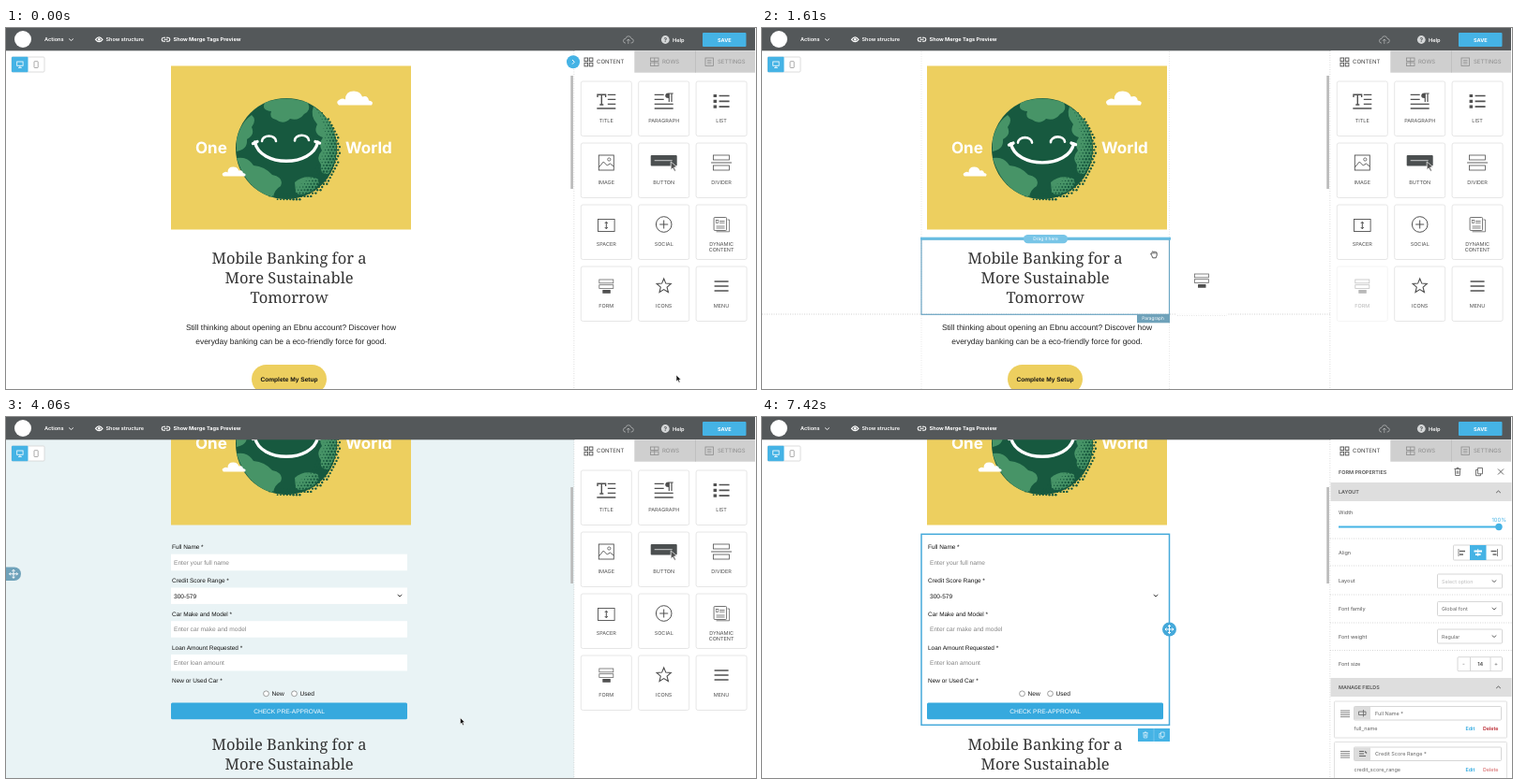
An HTML page for the animation above (7.49 s loop, 800x386 px).

```html
<!DOCTYPE html>
<html lang="en">
<head>
<meta charset="utf-8">
<title>Email editor</title>
<style>
html, body { margin: 0; width: 100%; height: 100%; overflow: hidden; background: #fff; }
svg { display: block; width: 800px; height: 386px; font-family: Inter, sans-serif; text-rendering: geometricPrecision; }
.arial { font-family: "Liberation Sans", Arial, sans-serif; }
.serif { font-family: "Noto Serif", Georgia, serif; }
.mid { text-anchor: middle; }
.bold { font-weight: 700; }
.semi { font-weight: 600; }
</style>
</head>
<body>
<svg id="stage" viewBox="0 0 800 386" fill="none"></svg>
<script>
const INK = '#505050', BLUE = '#45b3e5', DULL = '#6fa2ba', YELLOW = '#edcf5f', DARK = '#17593f', LAND = '#479467';

// Drawing helpers returning SVG markup
const rect = (x, y, w, h, fill, more = '') => `<rect x="${x}" y="${y}" width="${w}" height="${h}" fill="${fill}" ${more}/>`;
const box = (x, y, w, h, color, r = 0, fill = 'none', sw = 1) => rect(x, y, w, h, fill, `rx="${r}" stroke="${color}" stroke-width="${sw}"`);
const text = (x, y, s, size, fill = INK, cls = '') => `<text x="${x}" y="${y}" font-size="${size}" fill="${fill}" class="${cls}">${s}</text>`;
const line = (d, color = INK, w = 1, more = '') => `<path d="${d}" stroke="${color}" stroke-width="${w}" ${more}/>`;
const shape = (d, fill, more = '') => `<path d="${d}" fill="${fill}" ${more}/>`;
const disc = (x, y, r, fill, more = '') => `<circle cx="${x}" cy="${y}" r="${r}" fill="${fill}" ${more}/>`;
const group = (id, body) => `<g id="${id}">${body}</g>`;
const at = (x, y, body, s = 1) => `<g transform="translate(${x} ${y}) scale(${s})">${body}</g>`;

const round = 'stroke-linecap="round" stroke-linejoin="round"';
const dots = 'stroke-dasharray="1 1.5"';
const trash = c => line('M-3.5 -3H3.5M-1 -3V-4.2H1V-3M-2.7 -3L-2.3 4H2.3L2.7 -3M-.8 -1V2.3M.8 -1V2.3', c, .8);
const copy = c => line('M-1.5 -4H3.5V2.3H-1.5ZM-1.5 -2H-3.5V4.2H1.5V2.3', c, .8);
const chevron = (x, y, up, c = INK) => line(`M${x - 2.3} ${y + up}l2.3 ${-2 * up}l2.3 ${2 * up}`, c, .9);
const arrows = line('M-4.5 0H4.5M0 -4.5V4.5M-3 -1.5L-4.5 0L-3 1.5M3 -1.5L4.5 0L3 1.5M-1.5 -3L0 -4.5L1.5 -3M-1.5 3L0 4.5L1.5 3', '#fff', 1);

function globe() {
  let s = disc(299, 129, 54, DARK);
  s += shape('M276 80Q298 71 322 80Q326 88 318 92Q312 100 303 97Q296 104 288 98Q280 96 283 89Q272 88 276 80Z', LAND);
  s += shape('M246 119Q250 101 262 93Q268 98 262 106Q266 114 257 119Q258 130 246 132Z', LAND);
  s += shape('M246 139Q258 137 264 147Q276 148 284 157Q297 160 293 169Q286 173 285 181Q257 174 246 139Z', LAND);
  s += shape('M328 84Q349 98 352 122Q354 141 344 156Q334 157 336 146Q330 139 337 131Q333 124 338 117Q327 113 332 103Q324 94 328 84Z', LAND);
  s += shape('M308 165Q318 156 332 161Q337 166 327 174Q314 181 309 176Z', LAND);
  for (let row = 0; row < 36; row++) for (let col = 0; col < 36; col++) {
    const x = 242 + col * 3.4 + row % 2 * 1.7, y = 71 + row * 3.3;
    const d = Math.hypot(x - 299, y - 129), w = Math.cos(Math.atan2(y - 129, x - 299) - .5);
    if (w > 0 && d > 54 - 17 * w && d < 54 + 4 * w)
      s += disc(x.toFixed(1), y.toFixed(1), Math.min(1.2, .4 + (d - 54 + 17 * w) / 13).toFixed(1), DARK);
  }
  return s;
}

const cloud = shape('M2 15Q-2 11 3 9Q6 7 9 9Q9 0 18 0Q25 0 27 6Q33 4 34 10Q40 11 37 15Z', '#fff');

const picture = rect(176, 40.5, 256, 175, YELLOW) + globe() +
  group('face', line('M273 121A7.5 5.5 0 0 1 288 121M308 120.5A7.5 5.5 0 0 1 323 120', '#fff', 2.6, round) +
    line('M265.5 122C271 149 327 149 332.5 122M263.5 123.5L268 121.5M330 121.5L334.5 123', '#fff', 3.4, round)) +
  text(202, 134, 'One', 17, '#fff', 'bold') + text(362, 134, 'World', 17, '#fff', 'bold') +
  group('cloudR', cloud) + group('cloudL', cloud);

const copyBlock = ['Mobile Banking for a', 'More Sustainable', 'Tomorrow']
    .map((s, i) => text(302, 251.8 + 21.3 * i, s, 16.5, '#333', 'serif mid')).join('') +
  text(304, 323, 'Still thinking about opening an Ebnu account? Discover how', 8.45, '#222', 'arial mid') +
  text(304, 338, 'everyday banking can be a eco-friendly force for good.', 8.45, '#222', 'arial mid') +
  rect(262, 360, 80, 31, YELLOW, 'rx="15.5"') +
  text(302, 378, 'Complete My Setup', 6.6, '#111', 'arial mid bold');

function form() {
  const fields = [['Full Name', 'Enter your full name'], ['Credit Score Range', '300-579'],
    ['Car Make and Model', 'Enter car make and model'], ['Loan Amount Requested', 'Enter loan amount'], ['New or Used Car']];
  let s = fields.map(([label, hint], i) => {
    const y = 241.3 + 35.75 * i;
    return text(177, y, label + ' *', 6.45, '#111', 'arial') + (hint ? rect(176, y + 5.4, 252, 17.5, '#fff') +
      text(179, y + 16.6, hint, 6.6, i === 1 ? '#111' : '#858585', 'arial') : '');
  }).join('');
  s += chevron(420, 291, -1, '#222');
  for (const [x, label] of [[277.5, 'New'], [307.5, 'Used']])
    s += disc(x, 395.8, 2.9, '#fff', 'stroke="#777" stroke-width=".7"') + text(x + 6, 398.2, label, 6.6, '#111', 'arial');
  return s + rect(176, 405.5, 252, 17.8, '#36a9de', 'rx="1.5"') +
    text(302, 416.8, 'CHECK PRE-APPROVAL', 6.6, '#fff', 'arial mid');
}

const outline = (color, w) => box(170, 225.3, 264.5, 204, color, 0, 'none', w) + disc(434.5, 327, 7.5, color) + at(434.5, 327, arrows);
const hovered = outline(DULL, 1.4) + rect(400, 429, 35, 9, DULL) + text(417, 435.3, 'Form', 4.6, '#fff', 'mid semi');
const selected = outline('#45a9da', 1.5) + rect(401, 433, 34, 14, BLUE) + line('M418 433V447', '#8fd2f0', .6) +
  at(409, 440, trash('#fff'), .75) + at(426.5, 440, copy('#fff'), .75);

const formIcon = box(-7.5, -7, 15, 3.8, '#6a6a6a', 0, '#fff', .8) + box(-7.5, -1.3, 15, 3.8, '#6a6a6a', 0, '#fff', .8) + rect(-4, 4, 8.5, 3.8, INK, 'rx=".5"');
const ghost = rect(-27, -29, 55, 67, '#fff', 'rx="2" opacity=".85"') + line('M-26 37.5H27', '#ddd', .8, dots) + formIcon;
const dropZone = line('M170 25V386M434.5 25V386', '#ddd', .7, dots) + line('M0 306H606', '#c4c4c4', .8, dots) +
  box(170, 226, 264.5, 80.3, '#6ba5c3', 0, 'none', 1.2) + rect(169, 223.7, 267, 3, '#68bde2') +
  rect(279, 221, 47, 9.3, '#78c5e7', 'rx="4.6"') + text(302.5, 227.4, 'Drag it here', 4.8, '#fff', 'mid') +
  rect(400, 306, 35, 9.3, DULL) + text(417, 312.3, 'Paragraph', 4.8, '#fff', 'mid');

// Tool cards; icons are drawn around (0, 0)
const star = Array.from({ length: 10 }, (_, i) => {
  const a = i * Math.PI / 5 - Math.PI / 2, r = i % 2 ? 3.6 : 8;
  return (r * Math.cos(a)).toFixed(1) + ' ' + (r * Math.sin(a)).toFixed(1);
}).join('L');
const cards = [
  ['TITLE', line('M-9.3 -4V-6.7H-.7V-4M-5 -6.7V4M-7 4H-3', INK, 1.4) + line('M1.5 -6.7H10M1.5 -1.7H10M1.5 3.3H10M-10 8H10', INK, 1.3)],
  ['PARAGRAPH', line('M-10 -6.7H0M-10 -1.7H0M-10 3.3H10M-10 8H10', INK, 1.3) + shape('M10 -8.5H5Q1.5 -8.5 1.5 -5.5Q1.5 -3 5 -3V1H6.2V-7.4H7.7V1H8.9V-7.4H10Z', INK)],
  ['LIST', line('M-8.5 -5.5H-5M-8.5 .3H-5M-8.5 6.1H-5', INK, 3.2) + line('M-2.5 -5.5H8.5M-2.5 .3H8.5M-2.5 6.1H8.5', INK, 1.7)],
  ['IMAGE', box(-8, -8, 16, 16, INK, 0, 'none', .9) + line('M-8 5L-3 -1L1 3L4 1L8 4', INK, .9) + disc(3, -3.5, 1.6, 'none', `stroke="${INK}" stroke-width=".8"`)],
  ['BUTTON', rect(-14, -8, 28, 11.5, '#4b4f50', 'rx="1"') + line('M-10 -2.3H9', '#ddd', .9) + shape('M7.5 -1L14 4.5L11 5L12.8 8.5L11.3 9.2L9.6 5.8L7.5 7.5Z', INK, 'stroke="#fff" stroke-width=".7"')],
  ['DIVIDER', box(-8.5, -8, 17, 5, INK, 0, 'none', .8) + line('M-11 0H11', INK, .9) + box(-8.5, 3, 17, 5, INK, 0, 'none', .8)],
  ['SPACER', box(-8.8, -5.5, 17.6, 13, INK, 0, 'none', .9) + line('M0 -2.5V4.5M-1.5 -1L0 -2.8L1.5 -1M-1.5 3L0 4.8L1.5 3', INK, 1)],
  ['SOCIAL', disc(0, 0, 8.3, 'none', `stroke="${INK}"`) + line('M-4.5 0H4.5M0 -4.5V4.5', INK)],
  ['DYNAMIC|CONTENT', box(-8, -7.5, 13.5, 14, INK, 1, '#fff', .8) + line('M-5.5 7.8H8.5V-5H6.5M-2 -3.5H3.5M-2 -1.7H3.5M-5.5 2H3.5M-5.5 4H3.5', INK, .7) + box(-5.8, -4.5, 2.5, 3, INK, 0, 'none', .6)],
  ['FORM', formIcon],
  ['ICONS', line(`M${star}Z`, INK, 1.1)],
  ['MENU', line('M-7.5 -5H7.5M-7.5 0H7.5M-7.5 5H7.5', INK, 1.6)]
].map(([label, icon], i) => {
  const x = 613.3 + i % 3 * 61.4, y = 57 + Math.floor(i / 3) * 66;
  const names = label.split('|');
  return group(names[0], box(x, y, 54, 58.5, '#e0e0e0', 2, '#fff', .8) + at(x + 27, y + 21, icon) +
    names.map((s, j) => text(x + 27, y + 43.7 + 6.2 * j, s, 5.5, INK, 'mid')).join(''));
}).join('');

function properties() {
  const bar = (y, s) => rect(606.5, y, 193, 20, '#dedede') + text(615, y + 12, s, 5.4, '#555', 'semi') + chevron(785.5, y + 10, 1);
  const select = (y, s, c) => box(720.5, y, 69, 15, '#ccc', 1, '#fff', .8) + text(725, y + 9.5, s, 5.4, c) + chevron(781, y + 7.5, -1);
  const separators = [130, 159, 190, 220, 249.5].map(y => `M606 ${y}H800`).join('');
  let s = rect(606.5, 48, 194, 338, '#fff') + text(615, 60.8, 'FORM PROPERTIES', 5.5, '#555', 'semi') +
    at(742, 58.5, trash('#555')) + at(765, 58.5, copy('#555')) + line('M785 55.5L791 61.5M791 55.5L785 61.5', '#555', .9) +
    bar(70, 'LAYOUT') + line(separators, '#ccc', .8, dots) +
    ['Width|104', 'Align|147', 'Layout|177.3', 'Font family|207', 'Font weight|236.7', 'Font size|266.3']
      .map(v => v.split('|')).map(([label, y]) => text(615, y, label, 5.5, '#555')).join('') +
    text(778.5, 111.5, '100%', 5.8, BLUE) + line('M615 117.5H786', BLUE, 1.8) + disc(786, 117.5, 3.7, BLUE) +
    box(737.5, 137, 52, 16, '#ccc', 1, '#fff', .8) + rect(755, 137, 17.5, 16, BLUE) +
    line('M743 141V149M784.5 141V149', '#666', .8) + line('M744 143.5H750M744 147H748M777.5 143.5H783.5M779.5 147H783.5', '#666', 1.7) +
    line('M763.7 141V149', '#fff', .8) + line('M759.5 143.5H768M761 147H766.5', '#fff', 1.8) +
    select(168, 'Select option', '#bbb') + select(197.5, 'Global font', '#666') + select(227, 'Regular', '#666') +
    box(742, 256.7, 47.5, 15, '#ccc', 1, '#fff', .8) + line('M755.5 257V271.5M777 257V271.5', '#ccc', .8) +
    text(748.5, 266.4, '-', 6, '#666', 'mid') + text(766.3, 266.4, '14', 5.5, '#444', 'mid semi') + text(783, 266.4, '+', 6, '#666', 'mid') +
    bar(279, 'MANAGE FIELDS');
  [['Full Name *', 'full_name'], ['Credit Score Range *', 'credit_score_range']].forEach(([label, key], i) => {
    const y = 304 + 43.5 * i;
    s += box(610.5, y, 184, 39, '#d8d8d8', 1, '#fff', .8) +
      line([10, 12.2, 14.4, 16.6].map(d => `M617 ${y + d}H627`).join(''), '#777', .9) +
      box(631.5, y + 5.5, 157, 14.5, '#ccc', 1, '#fff', .8) + rect(632, y + 6, 17, 13.5, '#dcdcdc') +
      (i ? line(`M637 ${y + 10}H642M637 ${y + 12.5}H642M637 ${y + 15}H644M643 ${y + 10}l2 2`, '#666', 1.2)
         : line(`M636.5 ${y + 11}H644V${y + 14.5}H636.5ZM641.5 ${y + 9}V${y + 16.5}`, '#666', .8)) +
      text(654, y + 14.8, label, 5.5, '#666') + text(631.5, y + 31.3, key, 5.5, '#666') +
      text(750.5, y + 31.3, 'Edit', 5.3, '#2fa9e0', 'semi') + text(769, y + 31.3, 'Delete', 5.3, i ? '#dc7c7c' : '#b8232c', 'semi');
  });
  return s;
}

const header = rect(0, 0, 799, 24.3, '#54585a') + disc(18, 12, 9, '#fff') +
  text(41, 14.3, 'Actions', 5.6, '#fff', 'semi') + chevron(69.5, 12.5, -1, '#fff') +
  line('M95.5 12.3Q99.3 7.5 103 12.3Q99.3 17 95.5 12.3Z', '#fff', 1.1) + disc(99.3, 12.3, 1.4, '#fff') +
  text(106.5, 14.3, 'Show structure', 5.5, '#fff', 'semi') +
  line('M170 10.3H168Q166.2 10.3 166.2 12.3T168 14.3H170M171 10.3H173Q174.8 10.3 174.8 12.3T173 14.3H171M168.5 12.3H172.5', '#fff', 1.1) +
  text(178.5, 14.3, 'Show Merge Tags Preview', 5.6, '#fff', 'bold') +
  group('sync', line('M661 16H660.5Q658.5 16 658.5 13.7T661 11.3Q661.5 8.7 664 8.7T667 11.3Q669.3 11.5 669.3 13.7T667 16H666.5M663.8 17V12M662 13.8L663.8 12L665.6 13.8', '#fff', .9)) +
  disc(703.3, 12.5, 4.4, '#d5d7d8') + text(703.3, 14.9, '?', 6.5, '#54585a', 'mid bold') + text(711, 14.5, 'Help', 5.7, '#fff', 'semi') +
  rect(743, 5, 46.5, 15, BLUE, 'rx="1"') + text(766.3, 14.5, 'SAVE', 5.5, '#fff', 'mid bold');

const tabs = rect(606.5, 24.3, 194, 23.7, '#fff') + rect(670.3, 24.3, 128.7, 23.4, '#cfcfcf') + line('M735.5 24.5V47.7', '#bdbdbd', .8) +
  [[617, 32], [622.3, 32], [617, 37.3], [622.3, 37.3]].map(([x, y]) => box(x, y, 3.6, 3.6, INK, 0, 'none', .9)).join('') +
  text(630, 38.3, 'CONTENT', 6, '#444') +
  box(687.5, 32, 8.5, 3.5, '#8d8d8d', 0, 'none', .8) + box(687.5, 37, 8.5, 3.5, '#8d8d8d', 0, 'none', .8) + line('M691.7 32V40.5', '#8d8d8d', .8) +
  text(700, 38.3, 'ROWS', 6, '#8d8d8d') +
  box(746, 32, 8.5, 8.5, '#8d8d8d', 0, 'none', .8) + line('M748 34.5H752.5M748 36.3H752.5M748 38.1H752.5', '#8d8d8d', .7) +
  text(759, 38.3, 'SETTINGS', 6, '#8d8d8d');

const devices = box(6, 31, 35, 16, '#d4d4d4', 1, '#fff', .8) + rect(6, 30.7, 17.5, 16.6, BLUE, 'rx="1"') +
  box(11.7, 36, 6.4, 4.3, '#fff', 0, 'none', .8) + line('M14.9 40.3V42.5M13 42.5H16.8', '#fff', .8) +
  box(30, 35.7, 4.2, 6.8, '#888', .6, 'none', .7);

const arrow = shape('M0 0V7L1.6 5.6L2.8 8.2L4 7.6L2.9 5.1H5Z', '#111', 'stroke="#fff" stroke-width=".6"');
const hand = shape('M-2.3 1.2L-3.4 -.5Q-3 -1.6 -2 -.5V-2.5Q-1.3 -3.6 -.7 -2.6Q0 -3.8 .7 -2.6Q1.5 -3.4 2 -2.2Q3.2 -2.6 3.2 -1V1L2.2 3.8H-1.2Z', '#fff', 'stroke="#333" stroke-width=".8"') +
  line('M-.7 -2.4V-.5M.7 -2.4V-.5M2 -2V-.5', '#333', .6);

document.getElementById('stage').innerHTML =
  rect(0, 0, 800, 386, '#fff') + group('tint', rect(0, 24, 606, 362, '#e9f3f5')) +
  group('page', picture + group('form', form()) + group('hovered', hovered) + group('selected', selected) + group('rest', copyBlock)) +
  group('drop', dropZone) +
  group('rowHandle', rect(-10, 160.5, 26, 14.5, DULL, 'rx="7.2"') + at(8, 167.8, arrows)) +
  devices + group('thumb', rect(602.3, 0, 2.6, 1, '#b9b9b9')) +
  line('M606 24V386', '#c4c4c4', .8, dots) + header + tabs +
  group('tools', rect(606.5, 48, 194, 338, '#fff') + cards) +
  group('props', properties()) +
  group('collapse', disc(605, 36.3, 7, BLUE) + line('M604 34L606.3 36.3L604 38.6', '#fff', 1)) +
  group('ghost', ghost) + group('arrow', arrow) + group('hand', hand);

const $ = id => document.getElementById(id);
const show = (id, on) => $(id).style.display = on ? '' : 'none';
const move = (id, x, y, s = '') => $(id).setAttribute('transform', `translate(${x} ${y}) ${s}`);

// Eased value between keys [time, value]
function key(t, keys) {
  const i = keys.findIndex(k => k[0] > t);
  if (i < 0) return keys[keys.length - 1][1];
  if (!i) return keys[0][1];
  const [t0, a] = keys[i - 1], [t1, b] = keys[i], u = (t - t0) / (t1 - t0);
  return a + (b - a) * u * u * (3 - 2 * u);
}

const LOOP = 7490, STEP = 70, GRAB = 770, DROP = 2030, PICK = 4970;
const pointer = [[0, 715, 371], [560, 652, 303], [840, 652, 303], [1540, 418, 242], [2240, 418, 242],
  [3010, 369.5, 291], [3290, 369.5, 291], [3920, 484.5, 321.5], [4200, 484.5, 321.5], [4830, 330.5, 236]];
const pathX = pointer.map(([t, x]) => [t, x]), pathY = pointer.map(([t, , y]) => [t, y]);
const drift = [[0, 243], [700, 222], [1610, 227], [3290, 234], [4060, 243]];

function draw(now) {
  const t = Math.floor(now % LOOP / STEP) * STEP;
  const x = key(t, pathX), y = key(t, pathY);
  const scroll = key(t, [[2450, 0], [3150, 55], [3290, 55], [3850, 100]]);
  const drag = t >= GRAB && t < DROP, placed = t >= DROP, picked = t >= PICK;
  const outside = placed && !picked && x > 435;

  move('page', 0, -scroll);
  move('rest', 0, placed ? 204 : 0);
  show('form', placed);
  show('hovered', placed && !picked && !outside);
  show('selected', picked);
  show('tint', outside);
  show('rowHandle', outside);

  const left = key(t, drift);
  move('cloudL', left - 12.5, 148.5, 'scale(.66)');
  move('cloudR', 353 + (243 - left) * .86, 67.5);
  move('face', 0, (243 - left) / 10);

  const top = key(scroll, [[0, 51], [55, 60], [100, 75]]);
  move('thumb', 0, top, `scale(1 ${placed ? 103 : 121})`);

  show('collapse', t < GRAB);
  show('drop', drag && x < 470);
  show('ghost', drag && t > GRAB);
  move('ghost', x + 51, y + 28);
  $('FORM').style.opacity = drag ? .4 : 1;
  show('tools', !picked);
  show('props', picked);
  $('sync').style.opacity = picked && t < 5700 ? 1 : .45;

  const grabbing = t >= 560 && t < DROP;
  show('hand', grabbing);
  show('arrow', !grabbing && t < 6200);
  move('hand', x, y);
  move('arrow', x, y);
}

function loop() {
  draw(performance.now());
  requestAnimationFrame(loop);
}
loop();
</script>
</body>
</html>
```
